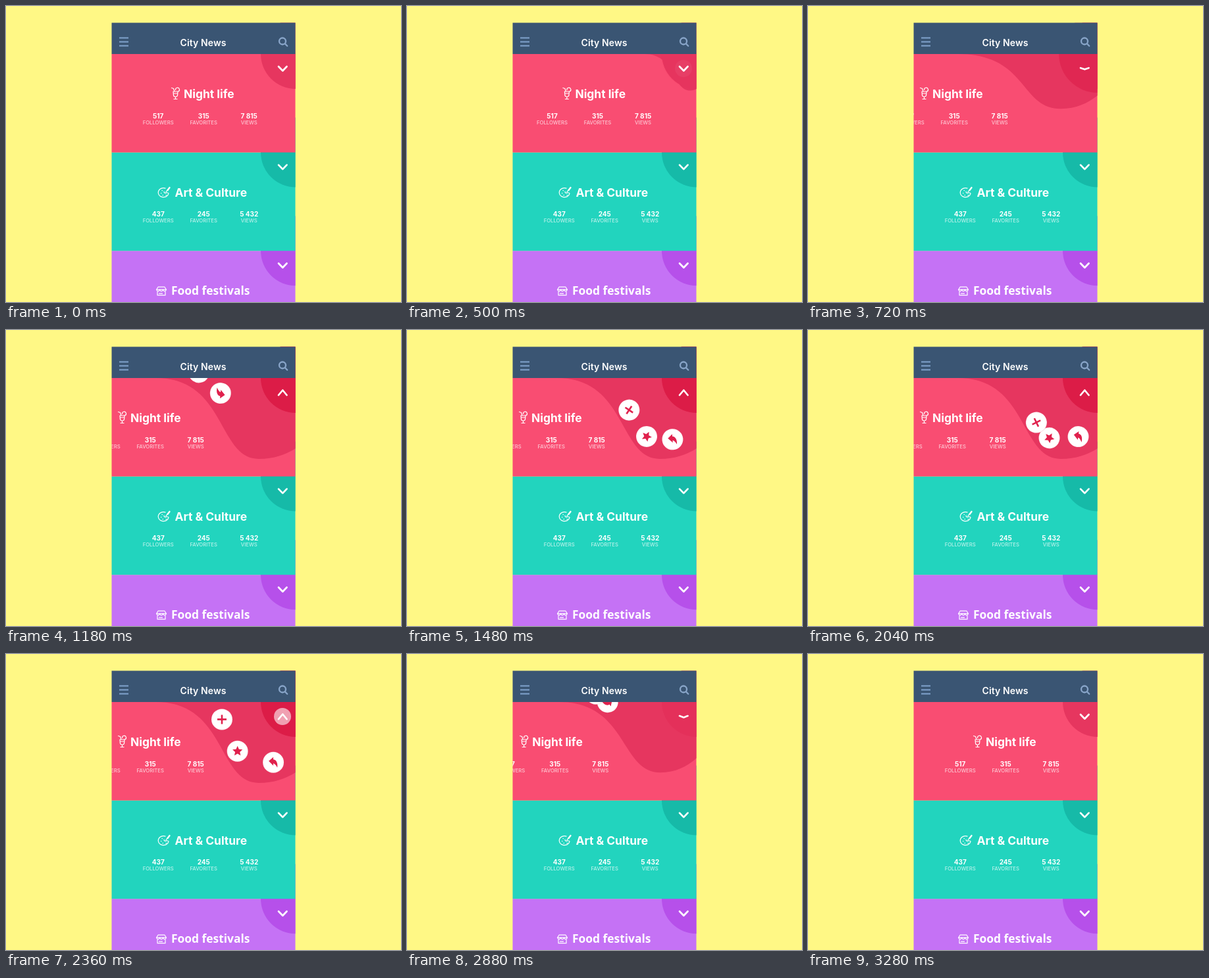
Write an HTML page that moves like this. It is 600 by 450 pixels and loops after 4.92 s.

```html
<!DOCTYPE html>
<html lang="en">
<head>
<meta charset="utf-8">
<title>City News</title>
<style>
  html, body { margin: 0; width: 100%; height: 100%; overflow: hidden; background: #fff885; }
  svg { display: block; width: 100%; height: 100%; }
  text { font-family: Inter, Roboto, sans-serif; fill: #fff; }
  .title { font-size: 17.4px; font-weight: 700; }
  .food { font-family: "Open Sans", "Noto Sans", sans-serif; }
  .number { font-size: 10px; font-weight: 700; text-anchor: middle; }
  .label { font-size: 7.7px; font-weight: 500; text-anchor: middle; opacity: .68; }
  .line { fill: none; stroke: #fff; stroke-linecap: round; stroke-linejoin: round; }
  .icon { stroke-width: 1.2; }
  .chevron { stroke-width: 2.7; }
</style>
</head>
<body>
<svg viewBox="0 0 600 450">
  <defs>
    <clipPath id="screen"><rect x="160.500" y="25.500" width="279" height="425"/></clipPath>
    <path id="track" d="M262 48C305 66 328 92 335 115S365 173 387 173C397 173 405 163 470 128"/>
  </defs>
  <rect width="600" height="450" fill="#fff885"/>
  <g clip-path="url(#screen)">
    <g id="sections"></g>
    <g id="header">
      <rect x="160" y="25" width="280" height="48" fill="#3a5573"/>
      <path d="M172 48.500h14M172 54.500h14M172 60.500h14" stroke="#80a3cd" stroke-width="2"/>
      <g fill="none" stroke="#88a5c9" stroke-width="2.300" stroke-linecap="round">
        <circle cx="420" cy="53.500" r="5"/><path d="M424 57.500l3.200 3.200"/>
      </g>
      <text x="264.500" y="60.500" font-size="14" font-weight="600" letter-spacing=".1">City News</text>
    </g>
  </g>
</svg>
<script>
const LOOP = 4920, TOP = 73, RIGHT = 440, SECTION = 149.6, RADIUS = 53;
const $ = id => document.getElementById(id);
const mix = (a, b, p) => a + (b - a) * p;
const ease = p => (1 - Math.cos(Math.PI * Math.min(1, Math.max(0, p)))) / 2;
const rise = (t, from, to) => ease((t - from) / (to - from));
// 0 to 1 while opening, back to 0 while closing.
const pulse = (t, a, b, c, d) => rise(t, a, b) - rise(t, c, d);

const chevron = flip =>
  `M414 ${mix(92, 99, flip)}L420.300 ${mix(98.5, 91.5, flip)}L426.500 ${mix(92, 99, flip)}`;

const sections = [
  { name: "Night life", x: 270, color: "#f94d72", dark: "#e6365f", stats: ["517", "315", "7 815"],
    icon: `<path d="M254 130h7l-.5 6q-.5 2-3 2t-3-2zM257.500 138v3.500M255 141.500h5M254.500 133h6M256 130l-1.500-4.500-3-1"/>
      <path d="M257.500 127.500a3 3 0 1 1 4 2.500"/>` },
  { name: "Art &amp; Culture", x: 256.5, color: "#22d4be", dark: "#16baa8", stats: ["437", "245", "5 432"],
    icon: `<path d="M242 127.500a8 7 0 1 0 5 8q-1-2-4-1t-3-2M248.500 126l-5.500 7"/>
      <path stroke-width="2.400" d="M248.500 126.500l-3 4"/>
      <path d="M237 131h.5M235.500 135h.5M238 138h.5M243 138h.5"/>` },
  { name: "Food festivals", x: 251, color: "#c572f5", dark: "#b650ea", stats: [], font: "food",
    icon: `<path d="M231 128h10l2.500 4h-15zM228.500 132q2.500 5 5 0q2.500 5 5 0q2.500 5 5 0M230 135.500v5h12v-5M232.500 138h5"/>` }
];
const labels = ["FOLLOWERS", "FAVORITES", "VIEWS"];

const statsMarkup = numbers => numbers.map((n, i) => {
  const x = 231.2 + i * 69;
  return `<text class="number" x="${x}" y="170.700">${n}</text>
    <text class="label" x="${x}" y="179.700">${labels[i]}</text>`;
}).join("");

// Later sections come first, so each one hides the upper half of the next corner.
$("sections").innerHTML = sections.map((s, i) => `
  <g transform="translate(0 ${i * SECTION})">
    <rect x="160" y="${TOP}" width="280" height="${SECTION}" fill="${s.color}"/>
    <circle cx="${RIGHT}" cy="${TOP}" r="${RADIUS}" fill="${s.dark}"/>
    <g id="drawer${i}"></g>
    <g id="title${i}">
      <g class="line icon">${s.icon}</g>
      <text class="title ${s.font || ""}" x="${s.x}" y="140">${s.name}</text>
    </g>
    <g id="stats${i}">${statsMarkup(s.stats)}</g>
    <g id="buttons${i}"></g>
    <path id="chevron${i}" class="line chevron" d="${chevron(0)}"/>
  </g>`).reverse().join("");

$("drawer0").innerHTML = `<path id="blob" fill="#e6365f"/>
  <circle id="corner" cx="${RIGHT}" cy="${TOP}" fill="#dc1c47"/>
  <circle id="tap" cx="420" cy="95" r="13" fill="#fff"/>`;

// A wave from the header down to its lowest point, then up to the right edge.
function blobPath(spread, depth) {
  const left = mix(388, 228, spread), dip = mix(RIGHT, 384, spread);
  const bottom = mix(126, 196, depth), side = mix(126, 180, depth * depth);
  const width = dip - left, rest = RIGHT - dip;
  return `M${left} ${TOP}C${left + .68 * width} ${TOP} ${dip - .4 * width} ${bottom} ${dip} ${bottom}
    C${dip + .42 * rest} ${bottom} ${RIGHT - .28 * rest} ${mix(side, bottom, .6)} ${RIGHT} ${side}V${TOP}Z`;
}

const star = Array.from({ length: 10 }, (_, i) => {
  const r = i % 2 ? 3.8 : 8, a = (i / 5 - .5) * Math.PI;
  return `${r * Math.cos(a)},${r * Math.sin(a)}`;
}).join(" ");

// Buttons roll along the track past their resting distance, swing back, then leave.
const buttons = [
  { rest: 205, icon: '<path d="M-7-2L0-8V-4.500C5-4 7 2 6 8C4 4 2 2 0 1.500V5Z"/>' },
  { rest: 139, icon: `<polygon points="${star}"/>` },
  { rest: 85, icon: '<path d="M-7 0H7M0-7V7" stroke="#e0214d" stroke-width="2.600"/>' }
];
$("buttons0").innerHTML = buttons.map((b, i) => `
  <g id="button${i}">
    <circle r="16" fill="#fff" stroke="#dc1c47" stroke-opacity=".18" stroke-width=".8"/>
    <g fill="#e0214d">${b.icon}</g>
  </g>`).join("");

function rolled(t, rest, i) {
  const peak = 238 - 28 * i, peakTime = 1700 + 30 * i;
  return peak * rise(t, 840 + 140 * i, peakTime)
    - (peak - rest) * rise(t, peakTime, 2160 + 70 * i)
    - rest * rise(t, 2580, 3028 - 20 * i);
}

function draw(t) {
  const slide = (id, opened, closing) => $(id).setAttribute("transform",
    `translate(${-81 * pulse(t, 420, opened, closing, 3260)})`);
  slide("title0", 710, 2850);
  slide("stats0", 763, 2804);

  $("blob").setAttribute("d", blobPath(
    pulse(t, 420, 720, 2860, 3110), pulse(t, 420, 1080, 2780, 3100)));
  $("corner").setAttribute("r", RADIUS + 6 * pulse(t, 420, 700, 700, 920));
  $("corner").setAttribute("opacity", pulse(t, 420, 1000, 2640, 2980));
  $("chevron0").setAttribute("d", chevron(pulse(t, 660, 822, 2780, 2940)));
  $("tap").setAttribute("opacity",
    .58 * (pulse(t, 110, 200, 420, 520) + pulse(t, 2270, 2360, 2580, 2680)));

  buttons.forEach(({ rest }, i) => {
    const s = rolled(t, rest, i), p = $("track").getPointAtLength(s);
    $("button" + i).setAttribute("transform",
      `translate(${p.x} ${p.y}) rotate(${(s - rest) * 1.4})`);
  });
}

const began = performance.now();
function tick() {
  draw((performance.now() - began) % LOOP);
  requestAnimationFrame(tick);
}
tick();
</script>
</body>
</html>
```
